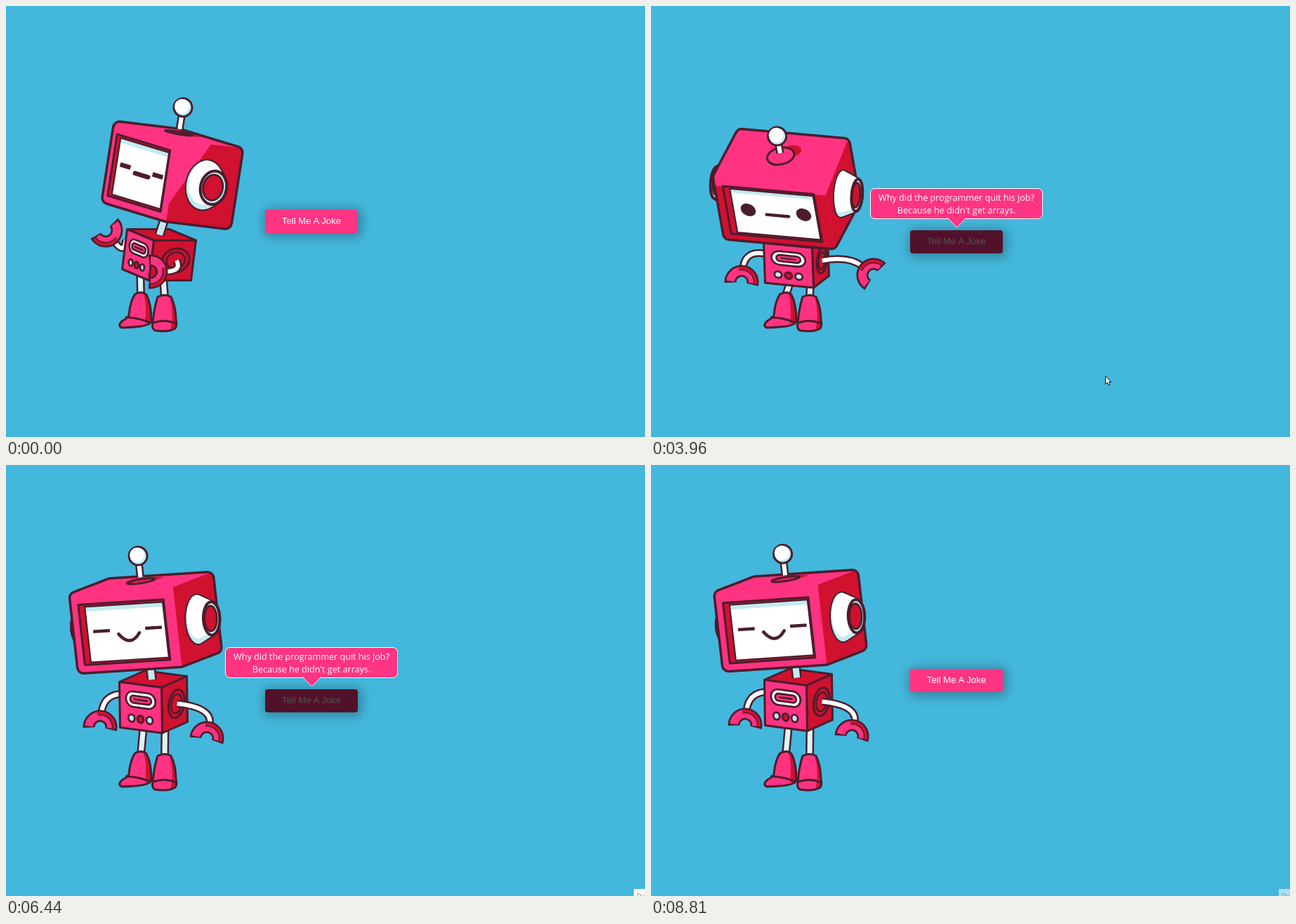
These frames come from a looping animation (910x615 px, 8.95 s). An HTML page with a canvas:

```html
<!DOCTYPE html>
<html lang="en">
<head>
<meta charset="utf-8">
<title>Joke robot</title>
<style>
  html, body { margin: 0; width: 100%; height: 100%; overflow: hidden; background: #44b7dc; }
  #stage { position: relative; width: 910px; height: 615px; overflow: hidden; }
  #stage > * { position: absolute; }
  #button {
    left: 369px; width: 132px; height: 33px; border-radius: 4px;
    background: #ff3482; color: #fff; text-align: center;
    font: 13.2px/32px "Liberation Sans", Arial, sans-serif;
    box-shadow: 2px 2px 15px 4px rgba(0, 0, 0, .28);
  }
  #bubble {
    left: 312px; top: 260px; width: 244px; height: 38px; padding-top: 4px;
    border: 1px solid #fff; border-radius: 7px; background: #ff3482; color: #fff;
    text-align: center; white-space: nowrap;
    font: 12.6px/18px "Open Sans", "Noto Sans", sans-serif;
  }
  #bubble svg { position: absolute; left: 107px; top: 41px; }
  #corner {
    left: 894px; top: 605px; width: 40px; height: 20px; padding-left: 4px;
    background: #fff; color: #777; font: 9px/20px "Open Sans", sans-serif;
  }
</style>
</head>
<body>
<div id="stage">
  <canvas id="robot" width="910" height="615"></canvas>
  <div id="button">Tell Me A Joke</div>
  <div id="bubble">Why did the programmer quit his job?<br>Because he didn't get arrays.
    <svg width="32" height="16"><path d="M2 0L15.500 14L29 0" fill="#ff3482" stroke="#fff" stroke-width=".8"/></svg>
  </div>
  <div id="corner">Dur</div>
  <svg id="cursor" width="16" height="20" fill="#fff" stroke="#111" stroke-linejoin="round" overflow="visible">
    <path id="arrow" d="M.5 .5V12L3 9.500L5 13.500L7 12.500L5.200 8.700H8.500Z"/>
    <path id="hand" d="M-1.500 8V.5Q0 -1 1.500 .5V5L6 6.500Q7.500 7 7 10L5.500 15H-.5L-4 10Q-4 8 -1.500 9.500Z"/>
  </svg>
</div>
<script>
const LOOP = 8950, STEP = LOOP / 72, LEAD = 30, TAU = Math.PI * 2;
const PINK = '#ff3381', RED = '#d0112f', DARK = '#4b1d2d', ICE = '#c4eaf0', WHITE = '#fff';
const $ = id => document.getElementById(id);
const ctx = $('robot').getContext('2d');

// A box is seen through its front centre and three drawn axes:
// half width u, half height v and full depth w. All parts sit on its faces.
const box = (c, u, v, w) => ({c, u, v, w});
const point = ({c, u, v, w}, x, y, z = 0) =>
  [0, 1].map(i => c[i] + x * u[i] + y * v[i] + z * w[i]);

// claws: x, y, angle. shade: depth and height where the side shadow starts.
const away = {
  head: box([191, 236], [46, 14], [-9, 58], [92, 11]),
  body: box([188, 355], [19, 8], [-3.5, 28.5], [60, 0]),
  claws: [[142, 320, 2.5], [206, 379, 1.57]],
  open: 1, smile: 0, pen: 6.5, redFront: 0, shade: [.5, .55]
};
const down = {
  head: box([175, 295], [79, 7], [8, 45], [36, -68]),
  body: box([196, 370], [34.5, 3.5], [1, 28.5], [22, -17]),
  claws: [[143, 392, -.75], [266, 409, .35]],
  open: 1, smile: 0, pen: 4.5, redFront: 1, shade: [.9, -.7]
};
const reaching = {...down, claws: [[129, 394, .1], [317, 384, -.9]]};
const resting = {...down, claws: [[129, 394, .1], [286, 412, .1]]};
const smiling = {
  head: box([183, 256], [76, 9], [-1, 55.5], [55, -24]),
  body: box([192, 366], [30, 4], [.5, 28.5], [36, -16]),
  claws: [[134, 396, .1], [286, 413, .2]],
  open: 1, smile: .36, pen: 4.5, redFront: 0, shade: [0, -1]
};
const laughing = {...smiling, open: 0,
  body: box([192, 346], [30, 4], [.5, 32.5], [36, -16]),
  claws: [[134, 374, .1], [286, 390, .2]]
};
const tiltLeft = {...laughing, head: box([170, 236], [74, -5], [6.5, 57], [57, -22])};
const tiltRight = {...laughing, head: box([195, 235], [74, 22], [-8, 54], [56, -22])};

const clamp = (v, a = 0, b = 1) => Math.min(b, Math.max(a, v));
const smooth = k => k * k * (3 - 2 * k);
const within = (t, a, b) => t >= a && t < b;
function mix(a, b, k) {
  if (typeof a === 'number') return a + (b - a) * k;
  if (Array.isArray(a)) return a.map((v, i) => mix(v, b[i], k));
  return Object.fromEntries(Object.keys(a).map(n => [n, mix(a[n], b[n], k)]));
}
function at(keys, t, ease = k => k) {
  const i = keys.findIndex(key => key[0] > t);
  if (i < 0) return keys[keys.length - 1][1];
  if (!i) return keys[0][1];
  const [t0, a] = keys[i - 1], [t1, b] = keys[i];
  return mix(a, b, ease((t - t0) / (t1 - t0)));
}

function stroke(color, width) {
  ctx.strokeStyle = color;
  ctx.lineWidth = width;
  ctx.stroke();
}
function paint(fill, width = 3) {
  if (fill) { ctx.fillStyle = fill; ctx.fill(); }
  if (width) stroke(DARK, width);
}
function poly(points) {
  ctx.beginPath();
  points.forEach(p => ctx.lineTo(...p));
  ctx.closePath();
}
function rounded(points, r) {
  const n = points.length;
  ctx.beginPath();
  ctx.moveTo(...mix(points[0], points[n - 1], .5));
  points.forEach((p, i) => ctx.arcTo(...p, ...points[(i + 1) % n], r));
  ctx.closePath();
}
// Traces a path in the plane of axes a and b, keeping the pen undistorted.
function onPlane(origin, a, b, trace) {
  ctx.save();
  ctx.transform(...a, ...b, ...origin);
  ctx.beginPath();
  trace();
  ctx.restore();
}
const disc = (p, a, b, ra, rb) => onPlane(p, a, b, () => ctx.ellipse(0, 0, ra, rb, 0, 0, TAU));
const onFront = (b, trace) => onPlane(b.c, b.u, b.v, trace);
const face = (b, x0, y0, x1, y1) =>
  [[x0, y0], [x1, y0], [x1, y1], [x0, y1]].map(p => point(b, ...p));

function ball(x, y, r, fill, width) {
  ctx.beginPath();
  ctx.arc(x, y, r, 0, TAU);
  paint(fill, width);
}
function tube(from, to, width, color = WHITE, bend = mix(from, to, .5)) {
  ctx.beginPath();
  ctx.moveTo(...from);
  ctx.quadraticCurveTo(...bend, ...to);
  stroke(DARK, width + 5);
  stroke(color, width);
}
function boot(outline, shadow, crease) {
  const path = new Path2D(outline);
  ctx.fillStyle = PINK;
  ctx.fill(path);
  ctx.fillStyle = RED;
  ctx.fill(new Path2D(shadow));
  ctx.strokeStyle = DARK;
  ctx.lineWidth = 3;
  ctx.stroke(new Path2D(crease));
  ctx.stroke(path);
}
function drawBoots() {
  boot('M184 411Q194 406 200 412Q207 425 207 450Q206 458 165 459Q158 456 166 449Q174 445 175 441Q177 420 184 411Z',
    'M196 410Q207 416 207 452L198 453Q201 428 196 410Z', 'M170 444Q190 445 206 452');
  boot('M216 415Q226 410 235 415Q242 430 242 447Q244 456 241 460Q232 466 212 463Q207 460 209 452Q211 430 216 415Z',
    'M233 414Q243 430 242 458L234 464Q240 440 233 414Z', 'M210 452Q226 446 242 453');
}

function drawArm(shoulder, [x, y, angle]) {
  const along = d => [x + d * Math.sin(angle), y - d * Math.cos(angle)];
  tube(shoulder, along(20), 6, WHITE, along(45));
  ctx.save();
  ctx.translate(x, y);
  ctx.rotate(angle);
  const arc = (r, from, to, color, width) => {
    ctx.beginPath();
    ctx.arc(0, 0, r, from, to);
    stroke(color, width);
  };
  arc(16, Math.PI - .14, TAU + .14, DARK, 17);
  arc(16, Math.PI, TAU, PINK, 11.5);
  arc(20, 4.4, TAU, RED, 4);
  arc(17.5, 4.4, TAU, DARK, 1.5);
  ctx.restore();
}

function drawBody(b) {
  const P = (...p) => point(b, ...p);
  poly([P(-1, -1), P(-1, -1, 1), P(1, -1, 1), P(1, -1)]); paint(RED);
  poly([P(1, -1), P(1, -1, 1), P(1, 1, 1), P(1, 1)]); paint(RED);
  poly(face(b, -1, -1, 1, 1)); paint(PINK);
  for (const [w, h, fill] of [[.7, .34, WHITE], [.5, .16, PINK]]) {
    onFront(b, () => ctx.roundRect(-w, -.32 - h, 2 * w, 2 * h, h));
    paint(fill, 2.7);
  }
  poly(face(b, -.33, -.36, .33, -.28)); paint(DARK, 0);
  for (const i of [-1, 0, 1]) {
    disc(P(i * .43 - .02, .52), b.u, b.v, .15, .16);
    paint(i ? ICE : RED, 2.8);
  }
  for (const [size, width] of [[1, 3], [.68, 2.5]]) {
    disc(P(1, 0, .58), b.w, b.v, .32 * size, .6 * size);
    paint(RED, width);
  }
}

function drawFace({head, open, smile, pen}) {
  const screen = face(head, -.73, -.65, .77, .74);
  poly(face(head, -.85, -.71, .79, .8)); paint(RED);
  ctx.save();
  poly(screen);
  paint(WHITE, 0);
  ctx.clip();
  poly(face(head, -.73, -.65, .77, -.53)); paint(ICE, 0);
  for (const x of [-.46, .54]) {
    if (open > .25) {
      disc(point(head, x, -.02), head.u, head.v, .135, .2 * open);
      paint(DARK, 0);
    } else {
      onFront(head, () => { ctx.moveTo(x - .16, -.02); ctx.lineTo(x + .16, -.02); });
      stroke(DARK, pen);
    }
  }
  onFront(head, () => { ctx.moveTo(-.14, .08); ctx.quadraticCurveTo(.06, .08 + smile, .26, .08); });
  ctx.lineCap = 'round';
  stroke(DARK, pen);
  ctx.restore();
  poly(screen); paint(null, 2.2);
}

function drawEar(b, side) {
  const ring = (k, size, lift) => disc(point(b, side * (1 + .27 * k), -lift, .5), b.w, b.v,
    mix(.28, .2, k) * size, mix(.6, .41, k) * size);
  const sweep = (fill, width, size = 1, lift = 0) => {
    for (let k = 0; k <= 1; k += 1 / 16) { ring(k, size, lift); paint(fill, width); }
  };
  sweep(null, 4);
  sweep(ICE, 0);
  sweep(WHITE, 0, .9, .06);
  ring(1, 1, 0); paint(ICE, 4);
  ring(.94, .74, 0); paint(RED, 2.8);
}

function drawHead(pose) {
  const b = pose.head, [z, y] = pose.shade;
  const P = (...p) => point(b, ...p);
  const hull = [P(-1, -1), P(-1, -1, 1), P(1, -1, 1), P(1, 1, 1), P(1, 1), P(-1, 1)];
  drawEar(b, -1);
  rounded(hull, 9);
  paint(PINK, 0);
  ctx.save();
  ctx.clip();
  ctx.globalAlpha = pose.redFront;
  poly(face(b, -1, -.7, 1, 1)); paint(RED, 0);
  ctx.globalAlpha = 1;
  poly([P(1, -1, z), P(1, -1, 1), P(1, 1, 1), P(1, 1), P(1, y)]); paint(RED, 0);
  ctx.restore();
  rounded(hull, 9); paint(null, 3.5);
  drawFace(pose);
  drawEar(b, 1);

  const base = P(0, -1.04, .5), top = P(0, -1.67, .5);
  disc(P(.14, -1.04, .62), b.u, b.w, .17, .12); paint(RED, 0);
  disc(base, b.u, b.w, .23, .18); paint(pose.redFront > .5 ? PINK : '#e51c58');
  tube(mix(base, top, .15), top, 6);
  ball(...top, 13, ICE);
  ball(top[0] - 1.5, top[1] - 1.5, 10.5, WHITE, 0);
}

function drawRobot(pose, lift) {
  const {head, body, claws} = pose;
  ctx.clearRect(0, 0, 910, 615);
  ctx.lineJoin = 'round';
  const hip = (x, z) => mix(point(body, x, .8, z), [0, lift], 0);
  tube(hip(0, .1), [192, 413], 7, '#dff4f6');
  tube(hip(.6, .45), [226, 416], 7, '#dff4f6');
  drawBoots();
  ctx.save();
  ctx.translate(0, lift);
  drawArm(point(body, -1, -.47), claws[0]);
  drawBody(body);
  drawArm(point(body, 1, 0, .6), claws[1]);
  tube(point(head, 0, .9, .5), point(body, 0, -1, .45), 9, ICE);
  drawHead(pose);
  ctx.restore();
}

const acts = [
  [0, away], [960, away], [1300, down], [1350, down], [1800, reaching], [2150, reaching],
  [2480, resting], [2660, resting], [3090, reaching], [4550, reaching], [5030, smiling]
];
const rest = [421, 311];
const route = [[100, [795, 570]], [1080, rest], [3200, rest], [3945, [645, 527]], [4340, [896, 607]]];

function robotAt(t) {
  const pose = at(acts, t, smooth);
  if (t < 5080) return {...pose, open: t % 1110 < 200 ? 0 : 1};
  const sway = clamp(2 * Math.sin(TAU * (t - 5285) / 1975), -1, 1);
  return mix(pose, mix(tiltLeft, tiltRight, (1 + sway) / 2), smooth(clamp((t - 5080) / 350)));
}

function render(t) {
  const laugh = clamp((t - 5300) / 200);
  drawRobot(robotAt(t), -1.5 * laugh * (1 - Math.cos(TAU * (t - 6440) / 530)));

  const told = within(t, 1690, 7970);
  $('bubble').style.display = told ? '' : 'none';
  $('button').style.top = told ? '320px' : '290.5px';
  $('button').style.filter = `brightness(${told ? .32 : within(t, 1050, 1690) ? .95 : 1})`;

  const [x, y] = at(route, t), pointing = within(t, 1050, 2690);
  $('cursor').style.display = within(t, 90, 4400) ? '' : 'none';
  $('cursor').style.transform = `translate(${x}px, ${y}px)`;
  $('arrow').style.display = pointing ? 'none' : '';
  $('hand').style.display = pointing ? '' : 'none';
  $('corner').style.opacity = clamp((t - 5050) / 350) * (1 - clamp((t - 8640) / 350));
}

const start = performance.now();
function tick() {
  const t = (performance.now() - start) % LOOP;
  const step = Math.min(71, Math.floor((t + LEAD) / STEP));
  render(Math.max(0, step * STEP - LEAD));
  requestAnimationFrame(tick);
}
tick();
</script>
</body>
</html>
```
